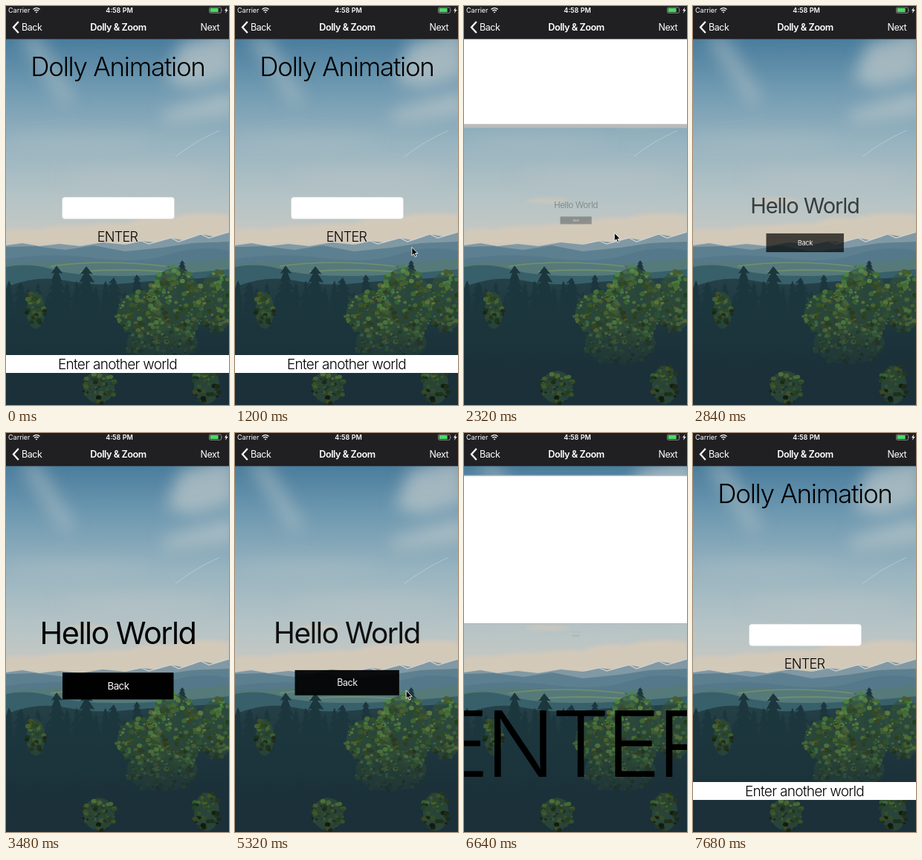
An HTML page for the animation above (7720 ms loop, 300 by 535 pixels).

```html
<!DOCTYPE html>
<html lang="en">
<head>
<meta charset="utf-8">
<title>Dolly &amp; Zoom</title>
<style>
html, body { margin: 0; width: 100%; height: 100%; overflow: hidden; background: #1c3038; }
svg { position: absolute; left: 0; top: 0; width: 300px; height: 535px; }
text { font: 300 18px Inter, "Liberation Sans", sans-serif; font-optical-sizing: none; letter-spacing: -.037em; }
.mid { text-anchor: middle; }
.bar text { fill: #fff; font-size: 12.5px; font-weight: 400; }
.bar .status { font-size: 9px; letter-spacing: 0; }
.bar .bold { font-weight: 600; }
</style>
</head>
<body>
<svg id="scene" viewBox="0 0 300 535">
  <defs>
    <linearGradient id="sky" x1="0" y1="44" x2="0" y2="325" gradientUnits="userSpaceOnUse">
      <stop offset="0" stop-color="#4a7d9d"/>
      <stop offset=".22" stop-color="#6d98b0"/>
      <stop offset=".5" stop-color="#98b4c0"/>
      <stop offset=".75" stop-color="#b4c3c6"/>
      <stop offset="1" stop-color="#cbcac2"/>
    </linearGradient>
    <linearGradient id="wood" x1="0" y1="350" x2="0" y2="535" gradientUnits="userSpaceOnUse">
      <stop offset="0" stop-color="#27444a"/>
      <stop offset=".3" stop-color="#1f383f"/>
      <stop offset="1" stop-color="#192f38"/>
    </linearGradient>
    <linearGradient id="shade" x1="0" y1="415" x2="0" y2="495" gradientUnits="userSpaceOnUse">
      <stop offset="0" stop-color="#1b3039" stop-opacity="0"/>
      <stop offset="1" stop-color="#1b3039" stop-opacity=".9"/>
    </linearGradient>
    <filter id="soft" x="-50%" y="-50%" width="200%" height="200%"><feGaussianBlur stdDeviation="11"/></filter>
    <filter id="haze" x="-20%" y="-50%" width="140%" height="200%"><feGaussianBlur stdDeviation="2.5"/></filter>
  </defs>
  <rect width="300" height="535" fill="url(#sky)"/>
  <g fill="#c2cbcb" filter="url(#soft)">
    <path d="M310 30L235 50 215 100 250 110 310 95Z" opacity=".7"/>
    <path d="M310 112L210 142 215 155 310 145Z" opacity=".65"/>
    <path d="M15 40L45 40 95 128 75 132Z" opacity=".45"/>
    <ellipse cx="100" cy="180" rx="100" ry="9" opacity=".25"/>
    <ellipse cx="180" cy="228" rx="110" ry="12" opacity=".3"/>
  </g>
  <path d="M228 202Q255 181 287 167" fill="none" stroke="#dce2df" stroke-width=".9" opacity=".5"/>
  <g fill="#d3c9b9" filter="url(#haze)">
    <path d="M0 301Q20 297 40 300Q70 294 100 295Q130 290 160 292Q190 280 215 285Q250 274 300 280V320H0Z"/>
    <ellipse cx="112" cy="261" rx="30" ry="3" opacity=".8"/>
  </g>
  <path d="M0 321L22 318 45 322 72 319 100 322 130 317 160 320 182 315 200 317 222 311 238 314 262 306 280 309 300 303V345H0Z" fill="#8199a4"/>
  <path d="M162 319L182 315 192 319 222 311 232 316 262 306 273 311 300 303" fill="none" stroke="#d0d3d1" stroke-width="1.2"/>
  <path d="M0 323L40 322 80 327 118 321 160 329 210 324 250 318 300 316V360H0Z" fill="#5d8091"/>
  <path d="M0 339Q60 330 120 338T220 333T300 328V380H0Z" fill="#55798a"/>
  <path d="M0 346Q70 339 140 344T300 338V385H0Z" fill="#567a7a"/>
  <path d="M60 349Q130 339 215 349M100 356Q170 351 230 358" fill="none" stroke="#71906f" stroke-width="1.6"/>
  <path d="M0 350Q30 344 62 353T150 362T300 353V400H0Z" fill="#38606a"/>
  <path d="M0 377Q40 360 80 368T160 372T300 363V535H0Z" fill="url(#wood)"/>
  <g id="trees"></g>
  <g id="leaves"></g>
  <rect y="415" width="300" height="120" fill="url(#shade)"/>
  <g id="bushes"></g>
</svg>

<svg viewBox="0 0 300 535">
  <g id="front">
    <text class="mid" x="150.5" y="94" style="font-size:35px">Dolly Animation</text>
    <rect x="75.5" y="256.3" width="151" height="29.1" rx="4" fill="#fff" stroke="#bbb" stroke-width=".2"/>
    <text class="mid" x="150" y="315.5" style="font-weight:350">ENTER</text>
    <rect y="468" width="300" height="24" fill="#fff"/>
    <text class="mid" x="150" y="487" style="font-size:19px">Enter another world</text>
  </g>
  <g id="back">
    <text class="mid" x="150.5" y="283" style="font-size:42px;font-weight:400">Hello World</text>
    <rect x="75" y="322" width="151.5" height="36.5"/>
    <text class="mid" x="151" y="345.2" fill="#fff" style="font-size:13.5px;font-weight:400">Back</text>
  </g>
  <g class="bar">
    <rect width="300" height="44.4" fill="#201f22"/>
    <text class="status" x="3" y="9">Carrier</text>
    <g fill="none" stroke="#fff" stroke-width="1.3">
      <path d="M36.5 4.6Q41 .8 45.5 4.6M38.2 6.6Q41 4.3 43.8 6.6"/>
      <path d="M39.6 7.9L41 9.4 42.4 7.9Q41 7 39.6 7.9Z" fill="#fff" stroke="none"/>
      <path d="M16.8 21L10 28.5 16.8 36" stroke-width="2.3"/>
    </g>
    <text class="status bold mid" x="152.5" y="9">4:58 PM</text>
    <rect x="273.5" y="2" width="16" height="7.4" rx="1.6" fill="none" stroke="#9a9a9c" stroke-width=".8"/>
    <rect x="274.6" y="3.1" width="11" height="5.2" rx=".7" fill="#4cd964"/>
    <path d="M290.6 4.5Q292 5.7 290.6 7Z" fill="#9a9a9c"/>
    <path d="M297.4 1.5L294 6.2H296L295 10 298.6 5H296.4Z" fill="#fff"/>
    <text x="21" y="33">Back</text>
    <text class="bold mid" x="151" y="33" style="font-size:12.7px">Dolly &amp; Zoom</text>
    <text x="261.5" y="33">Next</text>
  </g>
  <path id="cursor" d="M0 0V11.2L2.6 8.8 4.4 13 6.3 12.2 4.6 8.2H8Z" stroke="#fff" stroke-width=".9"/>
</svg>

<script>
const $ = id => document.getElementById(id);
const LOOP = 7720, ZOOM = 2100, ENTER_AT = 1553, RETURN_AT = 4921;

let seed = 11;
const rand = () => (seed = seed * 16807 % 2147483647) / 2147483647;

// Conifer: ragged tiers of branches, widening downwards
function conifer(x, top, height, width) {
  const left = [], right = [], tiers = 12;
  const reach = w => w * (.7 + rand() * .6);
  for (let i = 1; i <= tiers; i++) {
    const y = top + height * i / tiers, w = width * Math.sqrt(i / tiers);
    right.push(`${x + reach(w)} ${y}`, `${x + w * .45} ${y - 1}`);
    left.unshift(`${x - w * .45} ${y - 1}`, `${x - reach(w)} ${y}`);
  }
  return `<path d="M${x} ${top}L${right.join(' ')} ${left.join(' ')}Z" fill="#1c363d"/>`;
}

// Rounded crown: leaf clusters, lit from above, over a dim base
function crown(x, y, rx, ry, light = 29) {
  let out = `<ellipse cx="${x}" cy="${y}" rx="${rx * .95}" ry="${ry * .95}" fill="#33503a" opacity=".6"/>`;
  for (let i = rx * ry / 9; i > 0; i--) {
    const a = rand() * 6.283, r = Math.sqrt(rand()), drop = r * Math.sin(a), size = 1 + rand() * 2.2;
    out += `<ellipse cx="${x + rx * r * Math.cos(a)}" cy="${y + ry * drop}" rx="${size * 1.2}" ry="${size}"
      fill="hsl(${82 + rand() * 35} 32% ${light - 12 + rand() * 19 - drop * 5}%)"/>`;
  }
  return out;
}

let trees = '';
for (let x = 4; x < 200; x += 13) trees += conifer(x, 368 + rand() * 22, 100, 13);
$('trees').innerHTML = trees + [
  [20, 370, 120, 21], [68, 348, 130, 23], [108, 349, 130, 25],
  [145, 364, 100, 21], [176, 360, 90, 18], [237, 341, 60, 12]
].map(t => conifer(...t)).join('');
$('leaves').innerHTML = crown(40, 408, 13, 26, 23) + crown(284, 396, 26, 42)
  + crown(180, 412, 32, 30) + crown(228, 402, 38, 54) + crown(210, 452, 50, 30, 27);
$('bushes').innerHTML = crown(125, 511, 22, 23, 23) + crown(270, 508, 18, 27, 21);

// Standard ease-in-out, cubic-bezier(.42, 0, .58, 1)
function ease(x) {
  if (x <= 0) return 0;
  if (x >= 1) return 1;
  let lo = 0, hi = 1, t;
  for (let i = 0; i < 24; i++) {
    t = (lo + hi) / 2;
    if (1.26 * t * (1 - t) ** 2 + 1.74 * t * t * (1 - t) + t ** 3 < x) lo = t; else hi = t;
  }
  return t * t * (3 - 2 * t);
}

// Pointer visits as [time, x, y]
const visits = [
  [[1050, 300, 335], [1400, 156, 308], [1650, 156, 308], [1880, 169, 302], [2320, 202, 304], [2750, 300, 312]],
  [[4400, 300, 362], [4750, 205, 342], [5050, 205, 342], [5320, 230, 345], [5750, 300, 352]]
];

function pointer(time) {
  for (const path of visits)
    for (let i = 1; i < path.length; i++) {
      const [t0, x0, y0] = path[i - 1], [t1, x1, y1] = path[i];
      if (time >= t0 && time < t1) {
        const k = (time - t0) / (t1 - t0);
        return [x0 + (x1 - x0) * k, y0 + (y1 - y0) * k];
      }
    }
}

function zoom(node, scale, cy, shown) {
  node.style.display = shown ? '' : 'none';
  node.setAttribute('transform', `translate(150.5 ${cy}) scale(${scale}) translate(-150.5 ${-cy})`);
}

function draw(now) {
  const time = now % LOOP;
  const p = ease((time - ENTER_AT) / ZOOM) - ease((time - RETURN_AT) / ZOOM);
  const near = 1 + 87.6 * p;
  zoom($('front'), near, 290.5, near < 55);
  zoom($('back'), Math.max(p, .001), 267, p > .005);
  $('back').setAttribute('opacity', p);
  const at = pointer(time);
  $('cursor').style.display = at ? '' : 'none';
  if (at) $('cursor').setAttribute('transform', `translate(${at})`);
  requestAnimationFrame(() => draw(performance.now() - start));
}
const start = performance.now();
draw(0);
</script>
</body>
</html>
```
